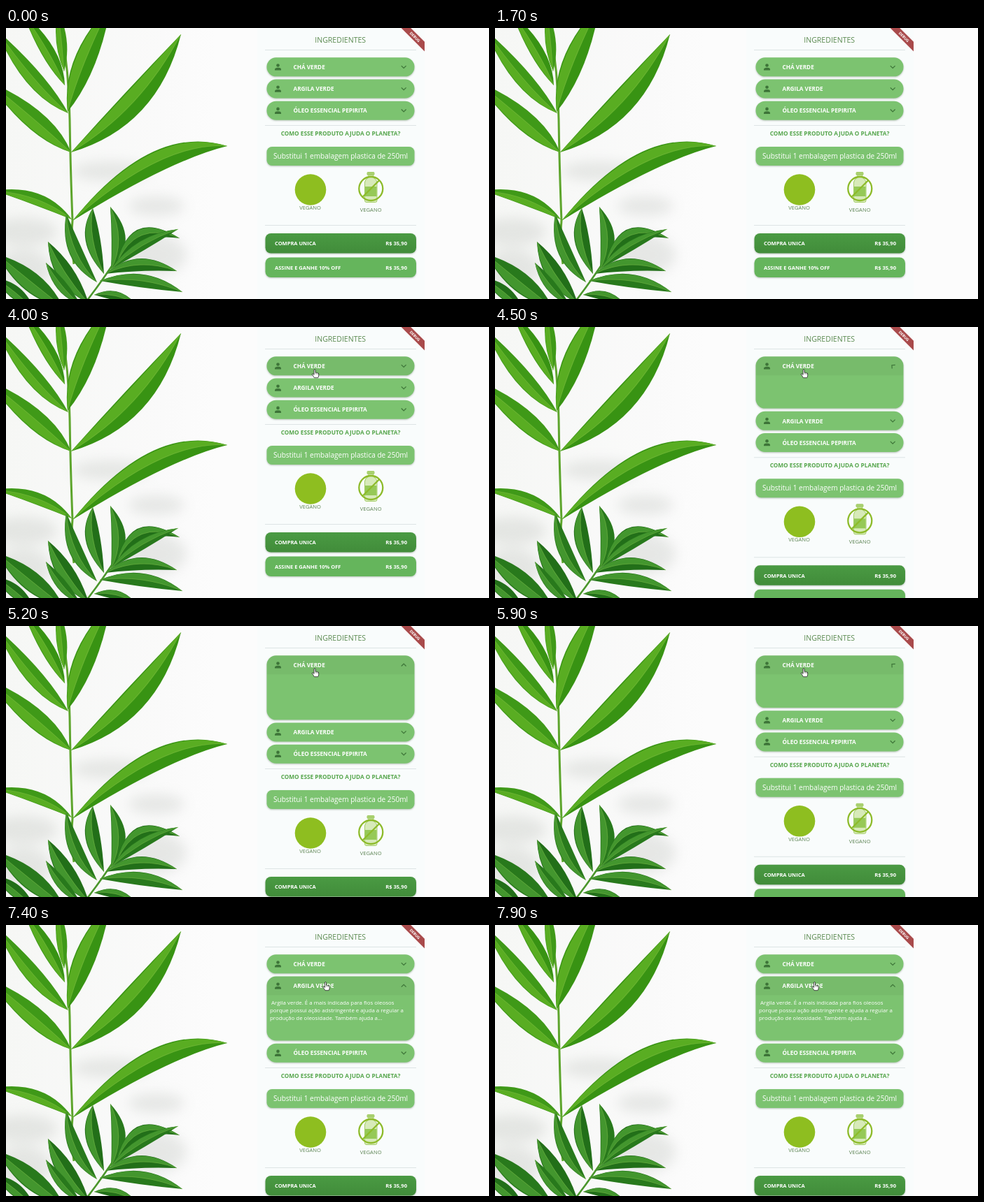
An HTML page that plays this animation: 690x388 px, repeating every 8 s.

```html
<!DOCTYPE html>
<html lang="pt">
<head>
<meta charset="utf-8">
<title>Ingredientes</title>
<style>
  html, body { margin: 0; width: 100%; height: 100%; overflow: hidden; background: #fcfcfc; }
  #stage { display: block; width: 690px; height: 388px; }
  text { font-family: "Open Sans", "Noto Sans", sans-serif; white-space: pre; }
  .bold { font-weight: 700; fill: #fff; }
  .rule { fill: #dde4e5; }
  .raised { filter: drop-shadow(0 1px 1px rgba(40, 70, 40, .32)); }
</style>
</head>
<body>
<svg id="stage" viewBox="0 0 690 388" xmlns="http://www.w3.org/2000/svg">
  <defs>
    <linearGradient id="wall"><stop offset="0" stop-color="#f6f7f5"/><stop offset=".75" stop-color="#fafafa"/><stop offset="1" stop-color="#fcfcfc"/></linearGradient>
    <linearGradient id="dark" x2="0" y2="1"><stop offset="0" stop-color="#4a9a43"/><stop offset="1" stop-color="#418c3a"/></linearGradient>
    <filter id="soft" x="-50%" y="-50%" width="200%" height="200%"><feGaussianBlur stdDeviation="9"/></filter>
    <clipPath id="page"><rect x="359" width="239" height="388"/></clipPath>
  </defs>
  <rect width="690" height="388" fill="#fcfcfc"/>
  <rect width="300" height="388" fill="url(#wall)"/>
  <g id="shade" fill="#b9bdb8" opacity=".3" filter="url(#soft)"></g>
  <g id="plant"></g>
  <g clip-path="url(#page)">
    <rect x="359" width="239" height="388" fill="#f9fcfc"/>
    <text x="477.7" y="21" font-size="10.55" text-anchor="middle" fill="#5a8a50">INGREDIENTES</text>
    <rect class="rule" x="370" y="31" width="216" height="1"/>
    <g id="tiles"></g>
    <g id="below"></g>
    <g transform="translate(584.2 12.8) rotate(45)">
      <rect x="-32" y="-4.8" width="64" height="9.6" fill="#a94a4b"/>
      <text y="2" font-size="5.4" text-anchor="middle" class="bold">DEBUG</text>
    </g>
  </g>
  <g id="hand">
    <path d="M-1 1Q-1-.5 0-.5T1 1V4.3Q2 3.6 2.7 4.6Q3.7 4 4.3 5Q5.6 4.6 5.7 6V8.3Q5.6 10 4.7 11.7H-.6Q-1.6 9.6-3.6 7.2Q-4 5.7-2.6 6L-1 7.4Z" fill="#fff" stroke="#222" stroke-width=".8" stroke-linejoin="round"/>
    <path d="M1 4.5V6.6M2.7 5V6.8M4.3 5.4V7" stroke="#444" stroke-width=".5"/>
  </g>
</svg>
<script>
const LOOP = 8000, FULL = 65, HEAD = 27;
const el = id => document.getElementById(id);

// Each leaf: base x, y, bend x, y, tip x, y, width
const upper = [
  [89, 122, 42, 82, -14, 2, 23],
  [84, 82, 66, 38, 24, -22, 19],
  [83, 62, 80, 20, 74, -26, 15],
  [88, 120, 106, 52, 150, -34, 30],
  [93, 178, 50, 138, -26, 76, 28],
  [93, 178, 192, 118, 250, 9, 34],
  [94, 274, 50, 238, -16, 233, 17],
  [95, 276, 222, 162, 316, 169, 30]
];
const lower = [
  [130, 364, 92, 326, 86, 266, 19],
  [140, 352, 116, 300, 124, 258, 21],
  [150, 346, 172, 304, 149, 256, 20],
  [158, 338, 184, 274, 248, 301, 19],
  [150, 345, 192, 306, 246, 288, 14],
  [142, 352, 190, 328, 244, 348, 18],
  [134, 362, 196, 354, 252, 378, 19],
  [118, 394, 82, 354, 60, 306, 24],
  [106, 396, 78, 372, 57, 336, 15],
  [126, 382, 158, 378, 186, 396, 13],
  [82, 400, 38, 366, -12, 324, 28],
  [40, 402, 14, 378, -14, 358, 18]
];

function leaf([bx, by, cx, cy, tx, ty, w], body, gleam) {
  const len = Math.hypot(tx - bx, ty - by);
  const nx = (by - ty) / len * w, ny = (tx - bx) / len * w;
  const curve = (k, x, y) => `Q${cx + nx * k} ${cy + ny * k} ${x} ${y}`;
  const shape = (a, b) => `M${bx} ${by}${curve(a, tx, ty)}${curve(b, bx, by)}Z`;
  return `<path d="${shape(1, -1)}" fill="${body}"/>
    <path d="${shape(-.9, .05)}" fill="${gleam}"/>
    <path d="M${bx} ${by}${curve(0, tx, ty)}" fill="none" stroke="#82bd4b" stroke-width=".7" opacity=".6"/>`;
}

el('plant').innerHTML =
  `<path d="M78-5Q90 60 91 130T95 276Q92 305 97 338" fill="none" stroke="#5da52c" stroke-width="3"/>
   <path d="M112 395Q138 362 166 318" fill="none" stroke="#4a962b" stroke-width="2.5"/>` +
  upper.map((l, i) => leaf(l, i % 2 ? '#389313' : '#3f9918', '#59ad22')).join('') +
  lower.map((l, i) => leaf(l, i % 2 ? '#226f19' : '#28791c', '#43962e')).join('');

el('shade').innerHTML = [[25, 292, 48, 20], [150, 205, 55, 14], [215, 255, 40, 14], [210, 325, 48, 30], [25, 345, 40, 28]]
  .map(([x, y, a, b]) => `<ellipse cx="${x}" cy="${y}" rx="${a}" ry="${b}"/>`).join('');

const label = (x, y, size, str, more = 'class="bold"') =>
  `<text x="${x}" y="${y}" font-size="${size}" ${more}>${str}</text>`;

const notes = ['', [' Argila verde. É a mais indicada para fios oleosos',
  'porque possui ação adstringente e ajuda a regular a',
  'produção de oleosidade. Também ajuda a...'], ''];

el('tiles').innerHTML = ['CHÁ VERDE', 'ARGILA VERDE', 'ÓLEO ESSENCIAL PEPIRITA'].map((name, i) => `
  <g class="tile">
    <clipPath id="clip${i}"><rect class="size" x="372.5" width="211" rx="13.3"/></clipPath>
    <rect class="size raised" x="372.5" width="211" rx="13.3" fill="#7cc370"/>
    <rect class="hover" x="372.5" width="211" height="${HEAD}" clip-path="url(#clip${i})"/>
    <g fill="#3d7438"><circle cx="388.5" cy="11.2" r="2.3"/><path d="M384 18.2V16.8Q384.4 14.6 388.5 14.5T393 16.8V18.2Z"/></g>
    ${label(410.5, 16.7, 8.2, name)}
    <path class="arrow" d="M-3.4-1.7L0 1.7L3.4-1.7" fill="none" stroke="#3d7438" stroke-width="1.2"/>
    <svg class="body" x="372" y="${HEAD}" width="212" height="0" overflow="hidden"><g class="note">
      ${notes[i] && notes[i].map((s, n) => label(5, 13.2 + n * 11.1, 7.9, s, 'fill="#fff"')).join('')}
    </g></svg>
  </g>`).join('');

const button = (y, fill, name) => `<rect class="raised" x="370.5" y="${y}" width="215.5" height="28.5" rx="8" fill="${fill}"/>
  ${label(384, y + 17.4, 7.5, name)}${label(573, y + 17.4, 7.6, 'R$ 35,90', 'class="bold" text-anchor="end"')}`;

el('below').innerHTML = `
  <rect class="rule" x="370" y="139" width="216" height="1"/>
  ${label(478, 154, 8.28, 'COMO ESSE PRODUTO AJUDA O PLANETA?', 'font-weight="700" text-anchor="middle" fill="#56a64c"')}
  <rect class="raised" x="372.5" y="170" width="211" height="27" rx="7.5" fill="#7cc370"/>
  ${label(478, 187, 10.08, 'Substitui 1 embalagem plastica de 250ml', 'text-anchor="middle" fill="#fff"')}
  <circle cx="435" cy="231.5" r="22.3" fill="#8ebe20"/>
  ${label(434.5, 260, 7.6, 'VEGANO', 'text-anchor="middle" fill="#5d8454"')}
  <g fill="#d7eab9" stroke="#a4ce68" stroke-width="1">
    <rect x="516" y="206.5" width="10" height="4" rx="1" fill="#a9d070"/>
    <path d="M518 210.5H524.5V214Q530 217 530 221V247Q530 249.5 527.5 249.5H515Q512.5 249.5 512.5 247V221Q512.5 217 518 214Z"/>
    <rect x="513" y="227" width="16.5" height="14" fill="#96c957" stroke="none"/>
  </g>
  <g fill="none" stroke="#8dbb2a" stroke-width="2.3"><circle cx="521.3" cy="230" r="17"/><path d="M509.3 242L533.3 218"/></g>
  ${label(521.2, 262.8, 7.6, 'VEGANO', 'text-anchor="middle" fill="#5d8454"')}
  <rect class="rule" x="370" y="282" width="216" height="1"/>
  ${button(294, 'url(#dark)', 'COMPRA UNICA')}${button(328.5, '#65b55c', 'ASSINE E GANHE 10% OFF')}`;

const tiles = [...document.querySelectorAll('.tile')].map(g => ({
  g, sizes: g.querySelectorAll('.size'), hover: g.querySelector('.hover'),
  arrow: g.querySelector('.arrow'), body: g.querySelector('.body'), note: g.querySelector('.note')
}));

const clamp = v => Math.min(1, Math.max(0, v));
const openness = (t, from, to) =>
  Math.pow(Math.min(clamp((t - from) / 200), 1 - clamp((t - to) / 200)), 1.6);

// Pointer: time, x, y
const route = [[3000, 468, 104], [3200, 441, 61], [5950, 441, 61], [6250, 446, 67], [6450, 446, 67], [6800, 456.5, 82], [LOOP, 456.5, 82]];
function pointer(t) {
  const i = Math.max(1, route.findIndex(p => p[0] >= t));
  const [a, b] = [route[i - 1], route[i]];
  const k = clamp((t - a[0]) / (b[0] - a[0]));
  return [a[1] + (b[1] - a[1]) * k, a[2] + (b[2] - a[2]) * k];
}

function draw(t) {
  const open = [openness(t, 4337, 5866), openness(t, 6985, 1e6), 0];
  const over = [clamp((t - 3150) / 100) - clamp((t - 6500) / 100), clamp((t - 6550) / 100), 0];
  let push = 0;
  tiles.forEach((tile, i) => {
    const p = open[i], extra = p * FULL;
    tile.g.setAttribute('transform', `translate(0 ${42.3 + i * 31.2 + push})`);
    tile.sizes.forEach(r => r.setAttribute('height', HEAD + extra));
    tile.hover.setAttribute('fill-opacity', .045 * over[i]);
    tile.arrow.setAttribute('transform', `translate(568.2 13.5) rotate(${180 * p})`);
    tile.body.setAttribute('height', extra);
    tile.note.setAttribute('transform', `translate(0 ${(extra - FULL) / 2})`);
    push += extra;
  });
  el('below').setAttribute('transform', `translate(0 ${push})`);
  const [x, y] = pointer(t);
  el('hand').setAttribute('transform', `translate(${x} ${y})`);
  el('hand').setAttribute('visibility', t < 3000 ? 'hidden' : 'visible');
}

const start = performance.now();
function tick() {
  draw((performance.now() - start) % LOOP);
  requestAnimationFrame(tick);
}
tick();
</script>
</body>
</html>
```
